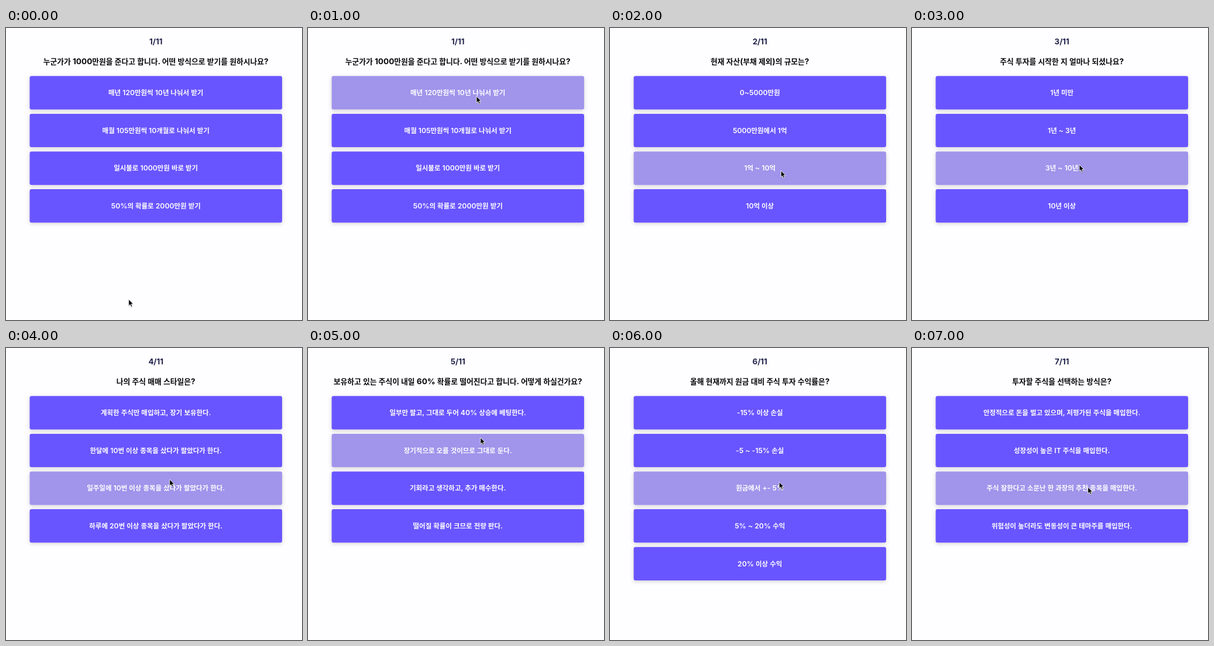
These frames come from a looping animation (506x500 px, 8 s). An HTML page:

```html
<!DOCTYPE html>
<html lang="ko">
<head>
<meta charset="utf-8">
<title>투자 성향 퀴즈</title>
<style>
  html, body { margin: 0; width: 100%; height: 100%; overflow: hidden; background: #fefdff; }
  svg { display: block; width: 100vw; height: 100vh; }
  text { font-family: Inter, "Noto Sans CJK KR", "Noto Sans CJK", sans-serif; text-anchor: middle; white-space: pre; }
  .ko { font-family: "Noto Sans CJK KR", "Noto Sans CJK", sans-serif; font-size: .94em; }
  .count { font-size: 13.3px; font-weight: 700; fill: #20224a; }
  .ask { font-size: 13.6px; font-weight: 700; fill: #08080c; }
  .label { font-size: 12.2px; font-weight: 600; fill: #fff; }
</style>
</head>
<body>
<svg viewBox="0 0 506 500">
  <defs>
    <filter id="shade" x="-5%" y="-5%" width="110%" height="112%">
      <feDropShadow dx="0" dy="2" stdDeviation="3.6" flood-color="#000" flood-opacity=".17"/>
    </filter>
    <filter id="soft" x="-50%" y="-30%" width="200%" height="170%">
      <feDropShadow dx="0" dy=".8" stdDeviation=".7" flood-color="#000" flood-opacity=".35"/>
    </filter>
  </defs>
  <rect width="506" height="500" fill="#fefdff"/>
  <text id="count" class="count" x="256.2" y="28.3"></text>
  <text id="ask" class="ask" x="256.2" y="62.3"></text>
  <g id="boxes" filter="url(#shade)"></g>
  <g id="labels"></g>
  <g id="cursor" filter="url(#soft)">
    <path d="M0 0V11.2L2.6 8.9L4.3 12.9L6.3 12L4.6 8.1H8Z" fill="#000" stroke="#fff" stroke-width=".9" stroke-linejoin="round"/>
  </g>
</svg>
<script>
const NS = 'http://www.w3.org/2000/svg';
const STEP = 1000, MID = 256.2, TOP = 82.3, PITCH = 64.6;
const BASE = '#6955ff', HOVER = '#a094eb';
const $ = id => document.getElementById(id);

const pages = [
  ['누군가가 1000만원을 준다고 합니다. 어떤 방식으로 받기를 원하시나요?',
    '매년 120만원씩 10년 나눠서 받기', '매월 105만원씩 10개월로 나눠서 받기',
    '일시불로 1000만원 바로 받기', '50%의 확률로 2000만원 받기'],
  ['현재 자산(부채 제외)의 규모는?',
    '0~5000만원', '5000만원에서 1억', '1억 ~ 10억', '10억 이상'],
  ['주식 투자를 시작한 지 얼마나 되셨나요?',
    '1년 미만', '1년 ~ 3년', '3년 ~ 10년', '10년 이상'],
  ['나의 주식 매매 스타일은?',
    '계획한 주식만 매입하고, 장기 보유한다.', '한달에 10번 이상 종목을 샀다가 팔았다가 한다.',
    '일주일에 10번 이상 종목을 샀다가 팔았다가 한다.', '하루에 20번 이상 종목을 샀다가 팔았다가 한다.'],
  ['보유하고 있는 주식이 내일 60% 확률로 떨어진다고 합니다. 어떻게 하실건가요?',
    '일부만 팔고, 그대로 두어 40% 상승에 베팅한다.', '장기적으로 오를 것이므로 그대로 둔다.',
    '기회라고 생각하고, 추가 매수한다.', '떨어질 확률이 크므로 전량 판다.'],
  ['올해 현재까지 원금 대비 주식 투자 수익률은?',
    '-15% 이상 손실', '-5 ~ -15% 손실', '원금에서 +- 5%', '5% ~ 20% 수익', '20% 이상 수익'],
  ['투자할 주식을 선택하는 방식은?',
    '안정적으로 돈을 벌고 있으며, 저평가된 주식을 매입한다.', '성장성이 높은 IT 주식을 매입한다.',
    '주식 잘한다고 소문난 한 과장의 추천 종목을 매입한다.', '위험성이 높더라도 변동성이 큰 테마주를 매입한다.']
];

// page, cursor x, cursor y for each second
const steps = [
  [0, 209.7, 464.6], [0, 288, 117], [1, 292.2, 244.2], [2, 286, 234],
  [3, 279.7, 225], [4, 294.8, 153.4], [5, 289.2, 229.4], [6, 300.7, 238.2]
];

function make(tag, attrs, parent) {
  const el = document.createElementNS(NS, tag);
  for (const k in attrs) el.setAttribute(k, attrs[k]);
  return parent.appendChild(el);
}

// Hangul and Latin runs are set at their own sizes
function setText(el, str) {
  el.textContent = '';
  for (const run of str.match(/[가-힣]+|[^가-힣]+/g) || []) {
    make('tspan', /[가-힣]/.test(run) ? { class: 'ko' } : {}, el).textContent = run;
  }
}

const rows = [0, 1, 2, 3, 4].map(i => {
  const y = TOP + i * PITCH;
  return {
    y,
    box: make('rect', { x: 40.5, y, width: 431.5, height: 57.2, rx: 3 }, $('boxes')),
    label: make('text', { class: 'label', x: MID, y: y + 32.8 }, $('labels'))
  };
});

let shown = -1;
function draw(ms) {
  const n = Math.floor(ms / STEP) % steps.length;
  if (n === shown) return;
  shown = n;
  const [p, x, y] = steps[n];
  const [ask, ...answers] = pages[p];
  setText($('count'), `${p + 1}/11`);
  setText($('ask'), ask);
  rows.forEach((row, i) => {
    const on = i < answers.length;
    const hit = y >= row.y && y < row.y + 57.2;
    row.box.setAttribute('display', on ? 'inline' : 'none');
    row.box.setAttribute('fill', hit ? HOVER : BASE);
    setText(row.label, on ? answers[i] : '');
  });
  $('cursor').setAttribute('transform', `translate(${x} ${y})`);
}

const start = performance.now();
function tick() {
  draw(performance.now() - start);
  requestAnimationFrame(tick);
}
tick();
</script>
</body>
</html>
```
